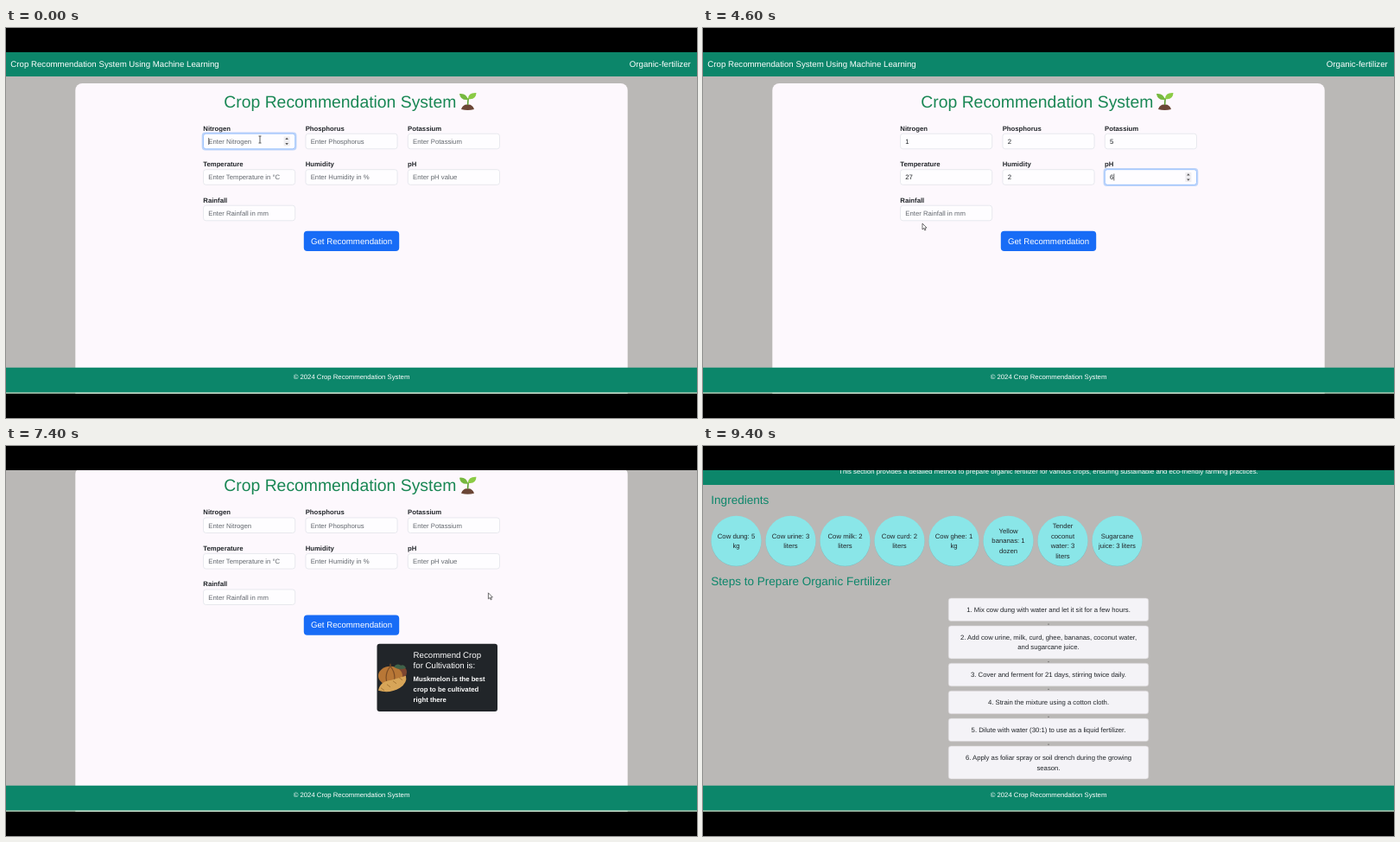
An HTML page that plays this animation: 800x451 px, repeating every 9500 ms.

```html
<!DOCTYPE html>
<html lang="en">
<head>
<meta charset="utf-8">
<title>Crop Recommendation System</title>
<style>
html, body { margin: 0; width: 100%; height: 100%; overflow: hidden; background: #000; }
svg { display: block; width: 800px; height: 451px; }
text { font-family: "Liberation Sans", Arial, sans-serif; text-rendering: geometricPrecision; white-space: pre; }
</style>
</head>
<body>
<svg viewBox="0 0 800 451">
  <rect y="28" width="800" height="394" fill="#bab8b6"/>
  <g id="page">
    <g id="base"></g>
    <g id="form"></g>
    <g id="result"></g>
  </g>
  <g id="footer"></g>
  <g id="pointer"></g>
  <path d="M0 0H800V28H0ZM0 423H800V451H0Z"/>
</svg>
<script>
const LOOP = 9500, SUBMIT = 6200, RELOAD = 6500;
const BODY = 7.74, LARGE = 9.68, TITLE = 19.36, SECTION = 13.55;
const GREEN = '#0c866a', INK = '#212529';
const $ = id => document.getElementById(id);

const rect = (x, y, w, h, fill, r = 0, more = '') =>
  `<rect x="${x}" y="${y}" width="${w}" height="${h}" rx="${r}" fill="${fill}" ${more}/>`;
const path = (d, fill, more = '') => `<path d="${d}" fill="${fill}" ${more}/>`;
// y is the visual middle of the line
const text = (s, x, y, size, fill, more = '') =>
  `<text x="${x}" y="${y + size * .36}" font-size="${size}" fill="${fill}" ${more}>${s}</text>`;
const MID = 'text-anchor="middle"', BOLD = 'font-weight="700"';
const lines = (list, x, y, size, step, fill, more) =>
  list.map((s, i) => text(s, x, y + (i - (list.length - 1) / 2) * step, size, fill, more)).join('');

const fields = [
  ['Nitrogen', 'Enter Nitrogen'], ['Phosphorus', 'Enter Phosphorus'], ['Potassium', 'Enter Potassium'],
  ['Temperature', 'Enter Temperature in °C'], ['Humidity', 'Enter Humidity in %'], ['pH', 'Enter pH value'],
  ['Rainfall', 'Enter Rainfall in mm']
].map(([label, hint], i) => ({
  label, hint, x: 228.3 + i % 3 * 118.4, y: 122 + Math.floor(i / 3) * 41.5
}));

const ingredients = ['Cow dung: 5|kg', 'Cow urine: 3|liters', 'Cow milk: 2|liters', 'Cow curd: 2|liters',
  'Cow ghee: 1|kg', 'Yellow|bananas: 1|dozen', 'Tender|coconut|water: 3|liters', 'Sugarcane|juice: 3 liters'];
const steps = ['1. Mix cow dung with water and let it sit for a few hours.',
  '2. Add cow urine, milk, curd, ghee, bananas, coconut water,|and sugarcane juice.',
  '3. Cover and ferment for 21 days, stirring twice daily.',
  '4. Strain the mixture using a cotton cloth.',
  '5. Dilute with water (30:1) to use as a liquid fertilizer.',
  '6. Apply as foliar spray or soil drench during the growing|season.'];

// Timed data: the first entry is the time in ms
const focusAt = [[0, 0], [950, 1], [1600, 2], [2200, 3], [3150, 4], [3950, 5], [5600, 6], [6300, -1]];
const typed = [[500, 0, '1'], [1200, 1, '2'], [1750, 2, '5'], [2400, 3, '2'], [2500, 3, '27'],
  [3500, 4, '2'], [4200, 5, '6'], [5200, 5, '4'], [5900, 6, '2']];
const moves = [[0, 294, 129], [600, 294, 129], [900, 381, 132], [1400, 381, 132], [1600, 481.5, 133],
  [1900, 481.5, 133], [2200, 262, 176], [2700, 262, 176], [3100, 372, 176], [3700, 372, 176],
  [3950, 488, 174], [4250, 488, 174], [4600, 254, 226], [4700, 254, 226], [5000, 482, 172],
  [5350, 482, 172], [5600, 262, 214], [5950, 262, 214], [6200, 371, 247], [6500, 371, 247],
  [6800, 378, 299], [7100, 378, 299], [7700, 737, 42], [8900, 737, 42], [9200, 760, 10]];
const scrolls = [[6850, 0], [7000, 119], [7200, 119], [7500, 0], [7850, 0], [8000, 194],
  [8400, 467], [8950, 467], [9300, 520]];

const smooth = p => p * p * (3 - 2 * p);
function along(keys, t, ease = p => p) {
  const n = keys.findIndex(k => k[0] > t);
  if (n === 0) return keys[0].slice(1);
  if (n < 0) return keys[keys.length - 1].slice(1);
  const a = keys[n - 1], b = keys[n], p = ease((t - a[0]) / (b[0] - a[0]));
  return a.slice(1).map((v, i) => v + (b[i + 1] - v) * p);
}

function sprout() {
  return path('M527 94Q529 88 534.5 88.500Q540 88 542 94Q534.500 96 527 94Z', '#6b4636') +
    path('M534.6 89Q534.800 85 535.200 81', 'none', 'stroke="#5c9e31" stroke-width="1.6"') +
    path('M535 83Q526 84 525 76Q533 75 535 83Z', '#76b83f') +
    path('M535 82Q535 74.500 544.500 75Q544 83.500 535 82Z', '#8bcb45');
}

function drawBase() {
  let s = rect(0, 28, 800, 28, GREEN) +
    text('Crop Recommendation System Using Machine Learning', 5.3, 42, LARGE, '#fff') +
    text('Organic-fertilizer', 721.8, 42, LARGE, '#fff') +
    rect(80.3, 64, 639.4, 422, '#fdf8fd', 8) +
    text('Crop Recommendation System', 252.3, 84.7, TITLE, '#198754') + sprout() +
    rect(0, 495, 800, 70, GREEN) +
    text('Organic Fertilizer Preparation', 400, 518, TITLE, '#fff', MID) +
    text('This section provides a detailed method to prepare organic fertilizer for various crops, ensuring sustainable and eco-friendly farming practices.',
      400, 549, BODY, '#fff', MID) +
    text('Ingredients', 9.3, 582, SECTION, GREEN) +
    text('Steps to Prepare Organic Fertilizer', 9.3, 676, SECTION, GREEN);
  ingredients.forEach((item, i) => {
    const x = 38.5 + 63 * i;
    s += `<circle cx="${x}" cy="630.3" r="29" fill="#7fb9ba"/><circle cx="${x}" cy="629.7" r="29" fill="#8ae6e8"/>` +
      lines(item.split('|'), x, 629.7, BODY, 11.6, INK, MID);
  });
  let y = 696;
  steps.forEach((item, i) => {
    const rows = item.split('|'), h = 15 + 11.5 * rows.length;
    s += rect(284.2, y, 231.6, h, '#f4f3f7', 3, 'stroke="#d3d1d2" stroke-width=".6"') +
      lines(rows, 400, y + h / 2, BODY, 11.6, INK, MID);
    y += h + 5.4;
    if (i < 5) s += rect(399.5, y - 2.4, 1, 1.2, '#555');
  });
  $('base').innerHTML = s;
}

function drawResult() {
  const seeds = [0, 1, 2, 3].map(i =>
    path(`M${434 + i * 7} ${319 - i * 4}l4 3`, 'none', 'stroke="#9b6a2c" stroke-width=".8"')).join('');
  $('result').innerHTML = rect(429.5, 268, 139.5, 78.3, INK, 3) +
    '<ellipse cx="456" cy="301" rx="8" ry="8" fill="#7d4630"/>' +
    '<ellipse cx="445" cy="305" rx="14" ry="11" fill="#b87736"/>' +
    path('M445 294Q437 304 442 316M445 294Q453 304 448 316M445 294V291', 'none', 'stroke="#7c4d25" stroke-width="1.2"') +
    path('M449 295Q452 290 457 293Q461 291 463 296Q456 299 449 295Z', '#3f6148') +
    path('M431 322Q433 311 446 310L463 305Q465 313 456 319Q444 326 431 322Z', '#d7a558') + seeds +
    lines(['Recommend Crop', 'for Cultivation is:'], 471.6, 287, LARGE, 11.7, '#fff', '') +
    lines(['Muskmelon is the best', 'crop to be cultivated', 'right there'], 471.6, 320.3, BODY, 11.7, '#fff', BOLD);
}

function drawField(f, value, focused, caret, spinner) {
  const mid = f.y + 9, edge = focused ? '#86b7fe' : '#dfe1e7';
  let s = text(f.label, f.x, f.y - 6.2, BODY, INK, BOLD);
  if (focused) s += rect(f.x - 1.6, f.y - 1.6, 109.8, 21.2, '#bfd5fa', 4);
  s += rect(f.x + .2, f.y + .2, 106.2, 17.6, '#fefdff', 3, `stroke="${edge}" stroke-width=".7"`) +
    text(value || f.hint, f.x + 6, mid, BODY, value ? INK : '#63686e');
  if (caret) s += rect(f.x + 6.2 + value.length * 4.3, mid - 4, .6, 8, '#111');
  if (spinner) {
    const x = f.x + 96.8;
    s += rect(x - 3.5, mid - 5.5, 7, 11, '#eeedf0') +
      path(`M${x - 1.8} ${mid - 2}h3.600l-1.800 -2.200ZM${x - 1.8} ${mid + 2}h3.600l-1.800 2.200Z`, '#555');
  }
  return s;
}

function drawForm(t, hover) {
  const fresh = t >= RELOAD;
  const values = fields.map(() => '');
  let last = 0;
  if (!fresh) for (const [at, i, v] of typed) if (at <= t) { values[i] = v; last = at; }
  const focusKey = focusAt.filter(k => k[0] <= t).pop();
  const focus = focusKey[1];
  const blink = (t - Math.max(last, focusKey[0])) % 1000 < 500 && t < SUBMIT;
  $('form').innerHTML = fields.map((f, i) => {
    const on = i === focus;
    return drawField(f, values[i], on, on && blink, on && i < 6);
  }).join('') +
    rect(344.8, 234.8, 110.4, 23.2, hover ? '#155bd0' : '#186cf6', 4) +
    text('Get Recommendation', 400, 246.2, LARGE, '#fff', MID);
}

function drawPointer(kind, x, y) {
  const shapes = {
    beam: path('M-1.500 -4H1.500M0 -4V4M-1.500 4H1.500', 'none', 'stroke="#333" stroke-width=".8"'),
    arrow: path('M0 0V7L1.700 5.500L2.800 8L3.900 7.500L2.800 5.100H5Z', '#fff', 'stroke="#333" stroke-width=".7"'),
    hand: path('M-.8 0Q0 -.8 .8 0V3.200L4 4V7L3 9.500H-.8L-3 6L-2.200 5.300L-.8 6.300Z', '#fff', 'stroke="#333" stroke-width=".7"')
  };
  $('pointer').innerHTML = `<g transform="translate(${x} ${y})">${shapes[kind]}</g>`;
}

function drawFooter(showLink) {
  $('footer').innerHTML = rect(0, 392.7, 800, 29, GREEN) + rect(0, 421.5, 800, 1.3, '#b9d6bd') +
    text('© 2024 Crop Recommendation System', 400, 403.7, BODY, '#fff', MID) +
    (showLink ? rect(-2, 411.3, 80.5, 10.5, '#dee4ee', 1.5) +
      text('127.0.0.1:5000/predict#organic', 1.8, 416.5, 5.25, '#454b58', 'style="font-family:\'Open Sans\',sans-serif"') : '');
}

function draw(t) {
  const [x, y] = along(moves, t, smooth), [scroll] = along(scrolls, t);
  const py = y + scroll;
  const inside = (l, top, w, h) => x >= l && x <= l + w && py >= top && py <= top + h;
  const onButton = inside(345, 235, 110, 23);
  const onLink = t > 7300 && t < 8150 && x > 720 && y < 56;
  const kind = onButton || onLink ? 'hand' : fields.some(f => inside(f.x, f.y, 107, 18)) ? 'beam' : 'arrow';
  $('page').setAttribute('transform', `translate(0 ${-scroll})`);
  $('result').style.display = t >= RELOAD ? '' : 'none';
  drawForm(t, onButton);
  drawFooter(onLink);
  drawPointer(kind, x, y);
}

drawBase();
drawResult();
const start = performance.now();
function tick() {
  draw((performance.now() - start) % LOOP);
  requestAnimationFrame(tick);
}
tick();
</script>
</body>
</html>
```
